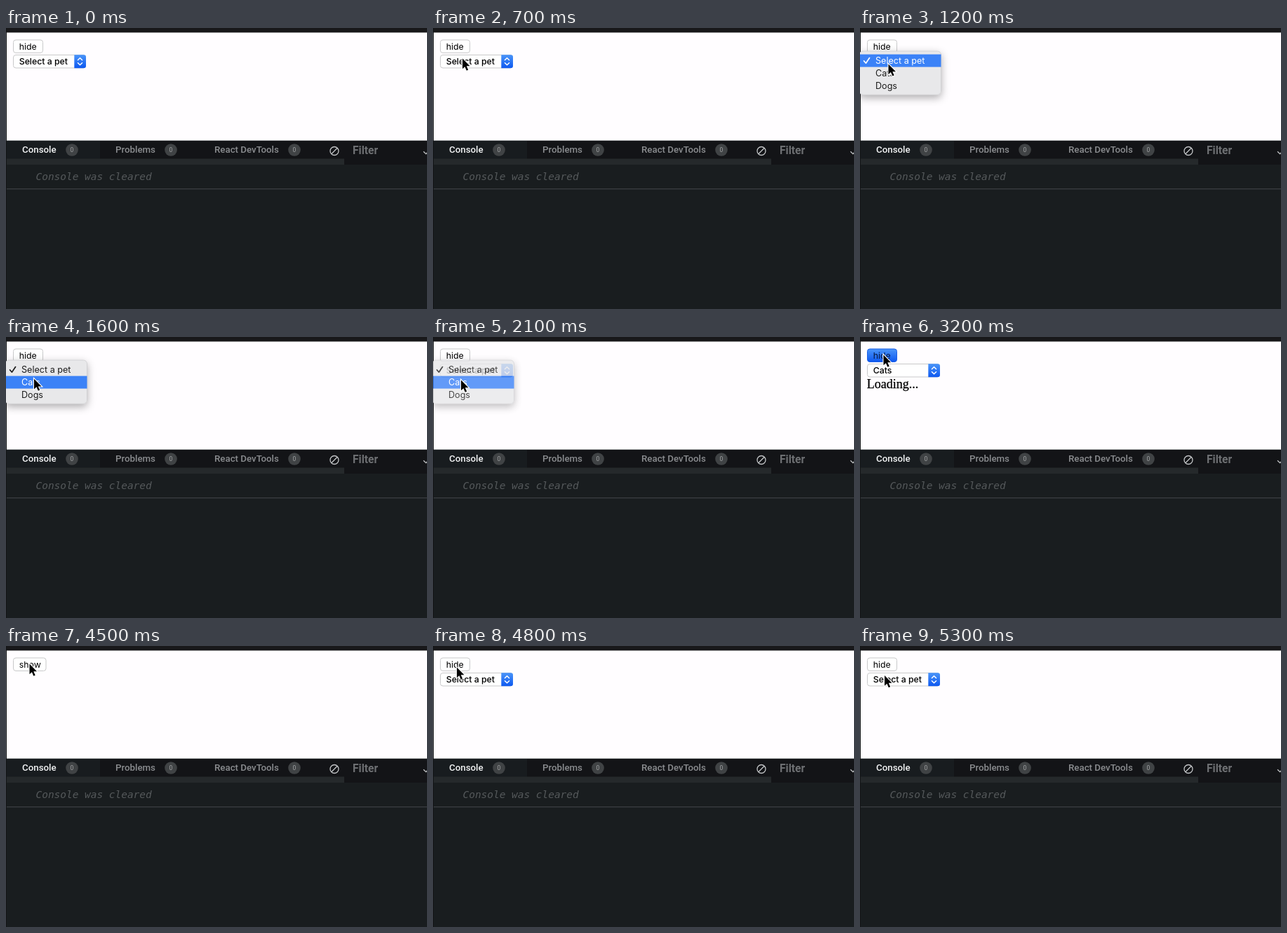
An HTML page for the animation above (5400 ms loop, 600x401 px).

```html
<!DOCTYPE html>
<html lang="en">
<head>
<meta charset="utf-8">
<title>Pet select demo</title>
<style>
  html, body { margin: 0; width: 100%; height: 100%; overflow: hidden; background: #191d1f; }
  svg { display: block; width: 600px; height: 401px; }
  text { white-space: pre; }
  .ui { font: 500 12.3px Inter, sans-serif; }
  .button { font-weight: 400; }
  .option { font-weight: 400; font-size: 12.6px; }
  .tab { font: 500 13.3px Roboto, sans-serif; fill: #8b8d90; }
  .tab.active { fill: #f3f4f5; }
  .count { font: 400 8.5px Roboto, sans-serif; fill: #a2a4a6; text-anchor: middle; }
  .filter { font: 700 15.6px Roboto, sans-serif; fill: #6d6f72; }
  .log { font: italic 14.44px "DejaVu Sans Mono", monospace; fill: #55595b; }
  .loading { font: 18px "Liberation Serif", serif; stroke: #000; stroke-width: .25; }
</style>
</head>
<body>
<svg viewBox="0 0 600 401">
  <defs>
    <linearGradient id="blue" x2="0" y2="1">
      <stop stop-color="#4a95f9"/><stop offset="1" stop-color="#0d58f0"/>
    </linearGradient>
    <filter id="shadow" x="-20%" y="-30%" width="140%" height="180%">
      <feDropShadow dx="0" dy="4" stdDeviation="6" flood-opacity=".32"/>
    </filter>
  </defs>

  <rect width="600" height="401" fill="#191d1f"/>
  <rect width="600" height="7" fill="#18181a"/>
  <rect x="1" y="6.5" width="599" height="153.5" fill="#fffdff"/>
  <rect x="1" y="160" width="599" height="1" fill="#a9abad"/>
  <rect y="161" width="600" height="34" fill="#131417"/>
  <rect x="1" y="161" width="133" height="26" fill="#181c1f"/>
  <rect x="1" y="186.5" width="481" height="8.5" fill="#25292b"/>
  <path d="M1 229.7H600" stroke="#43474a"/>
  <path d="M.5 0V401" stroke="#131517"/>
  <g id="tabs"></g>
  <g fill="none" stroke="#c3c5c7" stroke-width="1.3">
    <circle cx="468" cy="175.5" r="6"/>
    <path d="M463.8 179.7L472.2 171.3M595 176.3L598.5 179.7L602 176.3"/>
  </g>
  <text class="filter" x="494" y="179.5">Filter</text>
  <text class="log" x="42.5" y="217">Console was cleared</text>

  <g class="ui">
    <rect id="buttonBox" x="10.5" y="17" height="18.5" rx="3.5"/>
    <text id="buttonText" class="button" x="18.8" y="31"></text>
    <g id="select">
      <rect id="ring" x="9.3" y="37.3" width="105.4" height="20.6" rx="4" fill="none" stroke="#7eabf2" stroke-width="2.4"/>
      <rect x="10.5" y="38.5" width="103" height="18.5" rx="3.5" fill="#fff" stroke="#c9c9ca"/>
      <path d="M97.3 38.3H110.5Q114 38.3 114 41.5V54Q114 57.3 110.5 57.3H97.3Z" fill="url(#blue)"/>
      <path d="M102.4 45.8L105.5 42.7L108.6 45.8M102.4 49.7L105.5 52.8L108.6 49.7" fill="none" stroke="#fff" stroke-width="1.4" stroke-linecap="round" stroke-linejoin="round"/>
      <text id="choice" x="18.7" y="52"></text>
    </g>
    <text id="loading" class="loading" x="9.7" y="73.2">Loading...</text>
    <g id="menu">
      <rect x="-1" y="33" width="116.5" height="62.3" rx="5" fill="#e8e8ea" stroke="#c2c2c4" stroke-width=".6" filter="url(#shadow)"/>
      <rect id="highlight" width="115.5" height="18" fill="#3b82f7"/>
      <path id="check" d="M5.6 47L8.4 50.2L13.6 42.6" fill="none" stroke-width="1.7" stroke-linecap="round" stroke-linejoin="round"/>
      <g id="options"></g>
    </g>
  </g>
  <path id="cursor" d="M0 0V14.8L3.4 11.7L5.8 17.2L8.2 16.2L5.8 10.8H10.5Z" stroke="#fff" stroke-width="2.2" paint-order="stroke"/>
</svg>
<script>
const LOOP = 5400, STEP = 100, ROW = 18;
const OPTIONS = ['Select a pet', 'Cats', 'Dogs'];
const TABS = ['Console', 'Problems', 'React DevTools'];

const at = {
  enter: 100, open: 1100, hover: 1600, blink: 1900, fade: 2100,
  pick: 2200, load: 2300, press: 3200, hide: 3300, pressAgain: 4600, reveal: 4700
};

const $ = id => document.getElementById(id);
const visible = (id, on) => $(id).setAttribute('visibility', on ? 'visible' : 'hidden');
const set = (id, attrs) => {
  for (const key in attrs) $(id).setAttribute(key, attrs[key]);
};
const add = (parent, tag, attrs, text = '') => {
  const node = document.createElementNS('http://www.w3.org/2000/svg', tag);
  for (const key in attrs) node.setAttribute(key, attrs[key]);
  node.textContent = text;
  return parent.appendChild(node);
};

// Each badge follows its label; the next tab follows the badge
function buildTabs() {
  let x = 23;
  TABS.forEach((name, i) => {
    const label = add($('tabs'), 'text', { class: i ? 'tab' : 'tab active', x, y: 178.2 }, name);
    const badge = Math.round(x + label.getComputedTextLength() + 22);
    add($('tabs'), 'circle', { cx: badge, cy: 174, r: 8.8, fill: '#404345' });
    add($('tabs'), 'text', { class: 'count', x: badge, y: 177 }, '0');
    x = badge + 62;
  });
}

const options = OPTIONS.map((name, i) =>
  add($('options'), 'text', { class: 'option', x: 22, y: 51 + ROW * i }, name));

const START = { x: 55, y: 332 };
const MOVES = [
  { from: at.enter, to: 200, x: 57.5, y: 152.5 },
  { from: 400, to: 700, x: 42, y: 43.5 },
  { from: 900, to: 1500, x: 40, y: 54 },
  { from: 1500, to: 1700, x: 40, y: 61.5 },
  { from: at.pick, to: 2400, x: 36.5, y: 21.5 },
  { from: 2600, to: 3000, x: 33.5, y: 25.5 },
  { from: at.reveal, to: 5300, x: 35, y: 42 }
];
const easeOut = p => 1 - (1 - p) ** 2;

function cursorAt(t) {
  return MOVES.reduce((pos, { from, to, x, y }) => {
    const k = easeOut(Math.min(1, Math.max(0, (t - from) / (to - from))));
    return { x: pos.x + (x - pos.x) * k, y: pos.y + (y - pos.y) * k };
  }, START);
}

function drawButton(label, pressed) {
  set('buttonBox', {
    width: label === 'hide' ? 42 : 46.5,
    fill: pressed ? 'url(#blue)' : '#fff',
    stroke: pressed ? '#1d60e6' : '#c9c9ca'
  });
  $('buttonText').textContent = label;
  set('buttonText', { fill: pressed ? '#07183d' : '#000' });
}

function drawMenu(t) {
  const row = t < at.hover ? 0 : 1;
  const lit = t !== at.blink;
  visible('menu', t >= at.open && t < at.load);
  set('menu', { opacity: t < at.fade ? 1 : t < at.pick ? 0.8 : 0.3 });
  set('highlight', { y: 37.6 + ROW * row, opacity: +lit });
  set('check', { stroke: row ? '#1c1c1c' : '#fff' });
  options.forEach((text, i) =>
    text.setAttribute('fill', lit && i === row ? '#fff' : '#1c1c1c'));
}

function render(time) {
  const t = Math.floor(time % LOOP / STEP) * STEP;
  const hidden = t >= at.hide && t < at.reveal;
  const picked = t >= at.pick && t < at.hide;

  drawButton(hidden ? 'show' : 'hide', t === at.press || t === at.pressAgain);
  drawMenu(t);
  $('select').style.display = hidden ? 'none' : '';
  $('choice').textContent = OPTIONS[+picked];
  visible('ring', picked && t < at.press);
  visible('loading', t >= at.load && t < at.hide);

  const { x, y } = cursorAt(t);
  visible('cursor', t >= at.enter);
  set('cursor', { transform: `translate(${x} ${y})` });
}

buildTabs();
const start = performance.now();
function tick() {
  render(performance.now() - start);
  requestAnimationFrame(tick);
}
tick();
</script>
</body>
</html>
```
